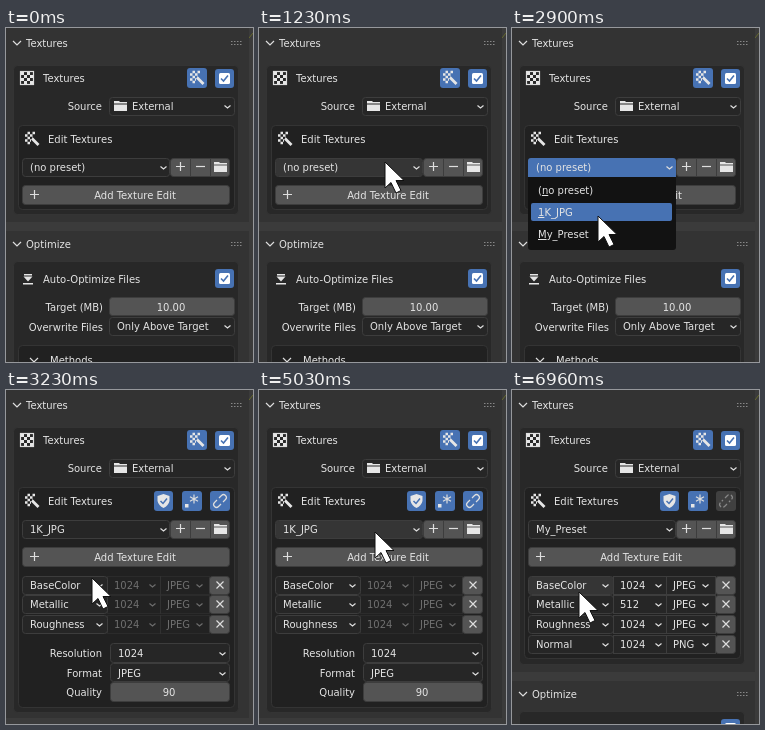
Recreate the animation shown at these times as an HTML page. Size 247 px wide and 334 px high, loop 8 s.

```html
<!DOCTYPE html>
<html lang="en">
<head>
<meta charset="utf-8">
<title>Texture presets</title>
<style>
html, body { margin: 0; width: 100%; height: 100%; overflow: hidden; background: #3b3b3b; }
svg { display: block; width: 247px; height: 334px; }
text { font: 10px "DejaVu Sans", sans-serif; fill: #e4e4e4; transform: translateY(4px); white-space: pre; }
.end { text-anchor: end; }
.mid { text-anchor: middle; }
.dim text { fill: #707070; }
.dim use { opacity: .4; }
.key { text-decoration: underline; }
.panel { fill: #333; }
.box { fill: #282828; stroke: #343434; }
.inner { fill: #212121; stroke: #343434; }
.field { fill: #262626; stroke: #3d3d3d; }
.btn { fill: #545454; stroke: #3d3d3d; }
.off { fill: #404040; }
.blue { fill: #4772b3; }
.line { fill: none; stroke: #dedede; stroke-width: 1.2; }
.icon { fill: #e6e6e6; }

/* One 8 s timeline; hard switches use step-end. */
.plain, .linked, .custom, .menu, .hot, .over, .row { animation: 8s step-end infinite; }
.plain { animation-name: plain; }
.linked { animation-name: linked; }
.custom { animation-name: custom; }
.menu { animation-name: menu; }
.hot { animation-name: hot; fill: #656565; }
.over { fill: #ffffff12; }
.preset { animation-name: preset; }
.first { animation-name: first; }
.row { fill: #4772b3; }
.r1 { animation-name: r1; }
.r2 { animation-name: r2; }
.r3 { animation-name: r3; }
@keyframes plain { 0% { opacity: 1 } 40.375%, 100% { opacity: 0 } }
@keyframes linked { 0% { opacity: 0 } 40.375% { opacity: 1 } 86.25%, 100% { opacity: 0 } }
@keyframes custom { 0% { opacity: 0 } 86.25%, 100% { opacity: 1 } }
@keyframes menu {
  0%, 39.5% { opacity: 0 }
  20.375%, 66.25% { opacity: 1 }
  85.375%, 100% { opacity: 0 }
}
@keyframes hot {
  0%, 12.25%, 57.4%, 100% { opacity: 0 }
  10.75%, 55.5% { opacity: 1 }
}
@keyframes preset {
  0%, 20.375%, 66.25%, 100% { opacity: 0 }
  13%, 58.5% { opacity: 1 }
}
@keyframes first {
  0%, 53.75% { opacity: 0 }
  41.25%, 87%, 100% { opacity: 1 }
}
@keyframes r1 {
  0%, 34.5%, 77.2%, 100% { opacity: 0 }
  33.1%, 75.5% { opacity: 1 }
}
@keyframes r2 {
  0%, 39.5%, 80%, 100% { opacity: 0 }
  34.5%, 77.2% { opacity: 1 }
}
@keyframes r3 { 0% { opacity: 0 } 80% { opacity: 1 } 85.375%, 100% { opacity: 0 } }

.cursor { fill: #fff; stroke: #111; animation: move 8s infinite linear; }
@keyframes move {
  0% { opacity: 0; transform: translate(150px, 217px) }
  6.249% { opacity: 0 }
  6.25% { opacity: 1; transform: translate(150px, 217px); animation-timing-function: ease-in-out }
  15.375% { transform: translate(126px, 134px) }
  31.25% { transform: translate(126px, 134px); animation-timing-function: ease-in-out }
  36.25% { transform: translate(86px, 188px) }
  53.74% { transform: translate(86px, 188px) }
  53.75% { transform: translate(86px, 184px); animation-timing-function: ease-in-out }
  60.6% { transform: translate(112px, 135px); animation-timing-function: ease-in-out }
  62.875% { transform: translate(116px, 142px) }
  73.75% { transform: translate(116px, 142px); animation-timing-function: ease-in }
  77% { transform: translate(97px, 172px); animation-timing-function: ease-out }
  82.875%, 100% { opacity: 1; transform: translate(67px, 202px) }
}
</style>
</head>
<body>
<svg viewBox="0 0 247 334">
  <defs>
    <path id="down" class="line" d="M-2.500-.5L.5 2L3.500-.5"/>
    <path id="open" class="line" d="M-4-2L0 2L4-2"/>
    <path id="plus" class="line" d="M-4 .5H5M.5-4V5"/>
    <path id="cross" class="line" d="M-3.500-3.500L3.500 3.500M-3.500 3.500L3.500-3.500"/>
    <path id="folder" class="icon" d="M-6-5H-1L0-4H7V-2.500H-6ZM-6-1.500H7V5H-6Z"/>
    <path id="grip" fill="none" stroke="#888" stroke-width="1.2" stroke-dasharray="1.5 1.500" d="M225 13.500H236M225 16.500H236"/>
    <g id="check">
      <rect class="blue" width="19" height="19" rx="3"/>
      <rect x="4" y="4" width="11" height="11" rx="1.500" fill="#fff"/>
      <path d="M6 9.500L8.500 12L13 6.500" fill="none" stroke="#4772b3" stroke-width="1.600"/>
    </g>
    <g id="wand">
      <path d="M-7-3.500H2M-4.500-1H1M-7 1.500H-1M-4.500 4H0M-4.500-6H3" fill="none" stroke="#e6e6e6" stroke-width="2.500" stroke-dasharray="2.500 2.500"/>
      <path d="M0-.5L6.500 6" stroke="#e6e6e6" stroke-width="2.800"/>
    </g>
    <path id="link" class="line" d="M-1-3L1.500-5.500A2.800 2.800 0 0 1 5.500-1.500L3 1M1 3L-1.500 5.500A2.800 2.800 0 0 1-5.500 1.500L-3-1"/>
    <g id="size">
      <rect class="field" x="101.500" y="-8.500" width="53" height="18"/>
      <use href="#down" x="146"/>
    </g>
    <g id="type">
      <rect class="field" x="154.500" y="-8.500" width="49" height="18"/>
      <use href="#down" x="193"/>
    </g>
    <g id="edit">
      <rect class="field" x="16.500" y="-8.500" width="85" height="18" rx="3"/>
      <use href="#down" x="93"/>
      <rect class="btn" x="203.500" y="-8.500" width="20" height="18" rx="3"/>
      <use href="#cross" x="214"/>
    </g>
    <g id="marks">
      <path class="icon" d="M157.500 104L163.500 106V111Q162.500 115.500 157.500 118Q152.500 115.500 151.500 111V106Z"/>
      <path d="M154.500 111L157 113.500L161 108.500" fill="none" stroke="#4772b3" stroke-width="1.500"/>
      <rect class="icon" x="179" y="114" width="3.500" height="3.500"/>
      <path class="line" stroke-width="1.500" d="M188 104.500V113.500M184 106.700L192 111.300M184 111.300L192 106.700"/>
    </g>
    <g id="optimize">
      <rect class="panel" y="203" width="243" height="140"/>
      <use href="#open" x="11" y="216"/>
      <text x="20" y="216">Optimize</text>
      <use href="#grip" y="201"/>
      <rect class="box" x="7.500" y="233.500" width="225" height="120" rx="4"/>
      <path class="icon" d="M18 246H26V247.500H18ZM17.500 248.500H26.500L22 253.500ZM17 255H27V256.500H17Z"/>
      <text x="37" y="251">Auto-Optimize Files</text>
      <use href="#check" x="209" y="241"/>
      <text class="end" x="97" y="279">Target (MB)</text>
      <rect class="btn" x="103.500" y="269.500" width="125" height="18" rx="3"/>
      <text class="mid" x="165" y="279">10.00</text>
      <text class="end" x="97" y="299">Overwrite Files</text>
      <rect class="field" x="103.500" y="289.500" width="125" height="18" rx="3"/>
      <text x="111" y="298">Only Above Target</text>
      <use href="#down" x="221" y="298"/>
      <rect class="inner" x="12.500" y="317.500" width="216" height="40" rx="4"/>
      <use href="#open" x="28" y="332"/>
      <text x="44" y="332">Methods</text>
    </g>
  </defs>

  <rect width="247" height="334" fill="#3b3b3b"/>
  <path d="M243 10L247 5" stroke="#65692d"/>

  <!-- Panel backs, one per layout -->
  <g class="plain">
    <rect class="panel" width="243" height="194"/>
    <rect class="box" x="7.500" y="37.500" width="225" height="149" rx="4"/>
    <rect class="inner" x="12.500" y="97.500" width="216" height="84" rx="4"/>
    <use href="#optimize"/>
  </g>
  <g class="linked">
    <rect class="panel" width="243" height="328"/>
    <rect class="box" x="7.500" y="37.500" width="225" height="285" rx="4"/>
    <rect class="inner" x="12.500" y="97.500" width="216" height="220" rx="4"/>
  </g>
  <g class="custom">
    <rect class="panel" width="243" height="282"/>
    <rect class="box" x="7.500" y="37.500" width="225" height="237" rx="4"/>
    <rect class="inner" x="12.500" y="97.500" width="216" height="171" rx="4"/>
    <use href="#optimize" y="88"/>
  </g>

  <!-- Shared controls -->
  <use href="#open" x="11" y="15"/>
  <text x="20" y="15">Textures</text>
  <use href="#grip"/>
  <rect x="14.500" y="43.500" width="13" height="13" class="line" stroke-width="1"/>
  <path d="M15 45.500H27M18 48.500H27M15 51.500H27M18 54.500H27" stroke="#e6e6e6" stroke-width="3" stroke-dasharray="3 3"/>
  <text x="37" y="50">Textures</text>
  <rect class="blue" x="181" y="40" width="20" height="20" rx="3"/>
  <use href="#wand" x="191" y="50"/>
  <use href="#check" x="209" y="41"/>
  <text class="end" x="96" y="78">Source</text>
  <rect class="field" x="103.500" y="69.500" width="125" height="18" rx="3"/>
  <use href="#folder" x="114" y="78"/>
  <text x="126" y="78">External</text>
  <use href="#down" x="221" y="78"/>
  <use href="#wand" x="26" y="111"/>
  <text x="42" y="111">Edit Textures</text>

  <rect class="field" x="16.500" y="130.500" width="147" height="18" rx="3"/>
  <rect class="over preset" x="17" y="131" width="146" height="17" rx="3"/>
  <rect class="btn" x="164.500" y="130.500" width="59" height="18" rx="3"/>
  <path d="M184.500 131V148M204.500 131V148" stroke="#3d3d3d"/>
  <use href="#plus" x="174" y="138"/>
  <path class="line" d="M190 138.500H199"/>
  <use href="#folder" x="214" y="139"/>
  <rect class="btn" x="16.500" y="157.500" width="207" height="19" rx="3"/>
  <rect class="hot" x="17" y="158" width="206" height="18" rx="3"/>
  <use href="#plus" x="28" y="166"/>
  <text class="mid" x="129" y="167">Add Texture Edit</text>

  <!-- Linked preset -->
  <g class="linked">
    <g class="blue">
      <rect x="148" y="101" width="19" height="20" rx="3"/>
      <rect x="176" y="101" width="20" height="20" rx="3"/>
      <rect x="204" y="101" width="20" height="20" rx="3"/>
    </g>
    <use href="#marks"/>
    <use href="#link" x="214" y="111"/>
    <use href="#edit" y="195"/><text x="24" y="195">BaseColor</text>
    <use href="#edit" y="214"/><text x="24" y="214">Metallic</text>
    <use href="#edit" y="234"/><text x="24" y="234">Roughness</text>
    <g class="dim">
      <use href="#size" y="195"/><text x="108" y="195">1024</text>
      <use href="#type" y="195"/><text x="161" y="195">JPEG</text>
      <use href="#size" y="214"/><text x="108" y="214">1024</text>
      <use href="#type" y="214"/><text x="161" y="214">JPEG</text>
      <use href="#size" y="234"/><text x="108" y="234">1024</text>
      <use href="#type" y="234"/><text x="161" y="234">JPEG</text>
    </g>
    <text class="end" x="96" y="263">Resolution</text>
    <rect class="field" x="104.500" y="253.500" width="119" height="19" rx="3"/>
    <text x="112" y="263">1024</text>
    <use href="#down" x="216" y="263"/>
    <text class="end" x="96" y="283">Format</text>
    <rect class="field" x="104.500" y="273.500" width="119" height="18" rx="3"/>
    <text x="112" y="283">JPEG</text>
    <use href="#down" x="216" y="283"/>
    <text class="end" x="96" y="302">Quality</text>
    <rect class="btn" x="104.500" y="292.500" width="119" height="19" rx="3"/>
    <text class="mid" x="163" y="302">90</text>
  </g>

  <!-- Custom preset -->
  <g class="custom">
    <g class="blue">
      <rect x="148" y="101" width="19" height="20" rx="3"/>
      <rect x="176" y="101" width="20" height="20" rx="3"/>
    </g>
    <use href="#marks"/>
    <rect class="off" x="204" y="101" width="20" height="20" rx="3"/>
    <use href="#link" x="214" y="111" opacity=".45" stroke-dasharray="5 2"/>
    <use href="#edit" y="195"/><text x="24" y="195">BaseColor</text>
    <use href="#edit" y="214"/><text x="24" y="214">Metallic</text>
    <use href="#edit" y="234"/><text x="24" y="234">Roughness</text>
    <use href="#edit" y="254"/><text x="24" y="254">Normal</text>
    <use href="#size" y="195"/><text x="108" y="195">1024</text>
    <use href="#type" y="195"/><text x="161" y="195">JPEG</text>
    <use href="#size" y="214"/><text x="108" y="214">512</text>
    <use href="#type" y="214"/><text x="161" y="214">JPEG</text>
    <use href="#size" y="234"/><text x="108" y="234">1024</text>
    <use href="#type" y="234"/><text x="161" y="234">JPEG</text>
    <use href="#size" y="254"/><text x="108" y="254">1024</text>
    <use href="#type" y="254"/><text x="161" y="254">PNG</text>
  </g>
  <rect class="over first" x="17" y="187" width="84" height="17" rx="3"/>

  <!-- Preset menu -->
  <g class="menu">
    <path d="M16 148H164V219Q164 222 161 222H19Q16 222 16 219Z" fill="#121212"/>
    <path class="blue" d="M16 149V133Q16 130 19 130H161Q164 130 164 133V149Z"/>
    <rect class="row r1" x="19" y="153" width="141" height="19" rx="2"/>
    <rect class="row r2" x="19" y="175" width="141" height="18" rx="2"/>
    <rect class="row r3" x="19" y="197" width="141" height="18" rx="2"/>
    <text x="26" y="162">(<tspan class="key">n</tspan>o preset)</text>
    <text x="26" y="184"><tspan class="key">1</tspan>K_JPG</text>
    <text x="26" y="206"><tspan class="key">M</tspan>y_Preset</text>
  </g>
  <text class="plain" x="24" y="139">(no preset)</text>
  <text class="linked" x="24" y="139">1K_JPG</text>
  <text class="custom" x="24" y="139">My_Preset</text>
  <use href="#down" x="157" y="139"/>

  <path class="cursor" d="M0 0V26L6 20.500L11 31L16 28.500L11 18.500H19Z"/>
</svg>
</body>
</html>
```
